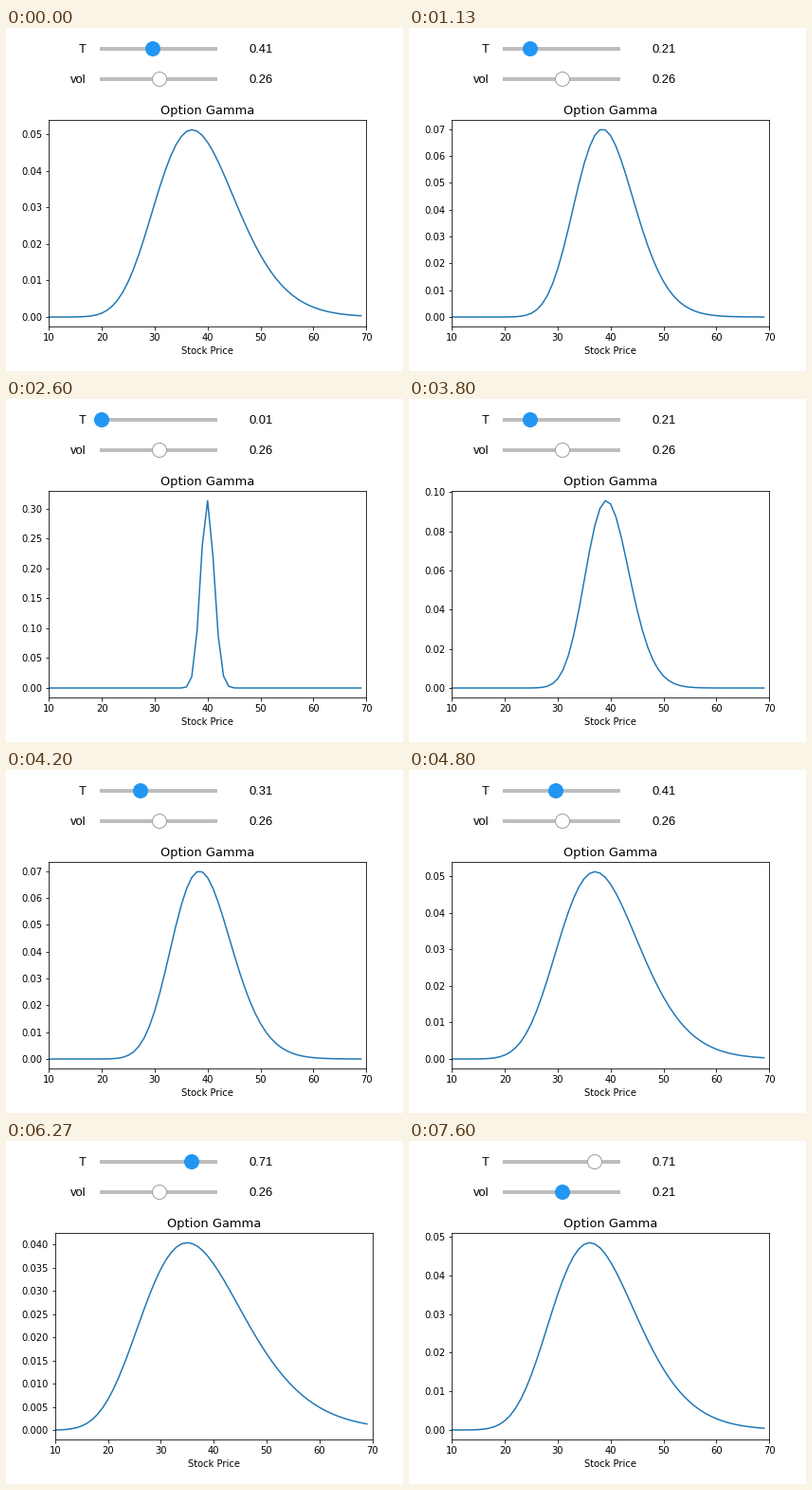
A matplotlib script that plays this animation: 419x362 px, repeating every 8 s.

```python
import numpy as np
import matplotlib.pyplot as plt
from matplotlib.animation import FuncAnimation
from matplotlib.patches import Circle

W, H, DPI = 419, 362, 72
LOOP, STEP, FPS = 8000, 20, 15
BLUE, GREY, EDGE = "#2196f3", "#bdbdbd", "#9e9e9e"
STRIKE, RATE, SPOT_SHIFT = 49, 0.05, 9
AX_W, AX_H, AX_LEFT, AX_BOTTOM = 334.8, 217.44, 45.4, 47.1
DIGIT = 6.36

# Key presses on the T slider and the later chart redraws, in 1/15 s
PRESSES = [6, 15, 22, 36, 50, 57, 63, 68, 75, 82, 90]
REDRAWS = [11, 17, 28, 39, 53, 61, 66, 72, 78, 86, 94]
HOVER, GRAB, RELEASE, VOL_REDRAW = 104, 109, 110, 114


def expiry(times, now):
    """T falls by 0.1 per step to 0.01, then climbs again."""
    steps = np.searchsorted(times, now, side="right")
    return 0.01 + 0.1 * abs(steps - 4)


def gamma(S, T, vol):
    s = vol * np.sqrt(T)
    d1 = (np.log(S / STRIKE) + RATE * T + s * s / 2) / s
    return np.exp(-d1 * d1 / 2) / np.sqrt(2 * np.pi) / (S * s)


plt.rcParams["font.family"] = "DejaVu Sans"
fig = plt.figure(figsize=((W + 1e-6) / DPI, (H + 1e-6) / DPI), dpi=DPI,
                 facecolor="white")

# Slider panel in pixel units, y pointing down
panel = fig.add_axes([0, 0, 1, 1])
panel.set(xlim=(0, W), ylim=(H, 0))
panel.axis("off")


def make_slider(name, x, y):
    font = dict(family="Liberation Sans", size=13, color="black",
                va="baseline")
    panel.plot([99, 223], [y, y], color=GREY, lw=4, solid_capstyle="butt")
    panel.text(85, y + 4, name, ha="right", **font)
    thumb = panel.add_patch(Circle((x, y), 7.5, lw=1, zorder=3))
    value = panel.text(256, y + 4, "", ha="left", **font)
    return thumb, value


def paint_thumb(thumb, on):
    thumb.set_facecolor(BLUE if on else "white")
    thumb.set_edgecolor(BLUE if on else EDGE)


t_thumb, t_value = make_slider("T", 155, 22)
vol_thumb, vol_value = make_slider("vol", 162, 54)

# Chart
ax = fig.add_axes([AX_LEFT / W, AX_BOTTOM / H, AX_W / W, AX_H / H])
prices = np.arange(10, 70)
curve, = ax.plot(prices, np.zeros(len(prices)), color="#1f77b4", lw=1.5)
ax.set_xlim(10, 70)
ax.set_title("Option Gamma", fontsize=13)
ax.set_xlabel("Stock Price", fontsize=10)


def update_chart(T, vol):
    y = gamma(prices + SPOT_SHIFT, T, vol)
    margin = 0.05 * np.ptp(y)
    low, high = y.min() - margin, y.max() + margin
    curve.set_ydata(y)
    ax.set_ylim(low, high)
    # Finer ticks need one more decimal, which pushes the axes right.
    shift = DIGIT if (high - low) / 9 <= 0.005 else 0
    ax.set_position([(AX_LEFT + shift) / W, AX_BOTTOM / H,
                     AX_W / W, AX_H / H])


def update(i):
    now = (i + 1) * STEP * FPS / 1000
    T = expiry(PRESSES, now)
    t_thumb.center = (np.floor(101 + 135 * (T - 0.01) + 0.501), 22)
    vol_thumb.set_radius(9.5 if GRAB <= now < RELEASE else 7.5)
    paint_thumb(t_thumb, now < GRAB)
    paint_thumb(vol_thumb, now >= HOVER)
    t_value.set_text(f"{T:.2f}")
    vol_value.set_text("0.26" if now < RELEASE else "0.21")
    update_chart(expiry(REDRAWS, now), 0.26 if now < VOL_REDRAW else 0.2135)
    return t_thumb, vol_thumb, t_value, vol_value, curve


anim = FuncAnimation(fig, update, frames=LOOP // STEP, interval=STEP,
                     init_func=lambda: update(0), repeat=True,
                     repeat_delay=0, blit=False)
plt.show()
```
